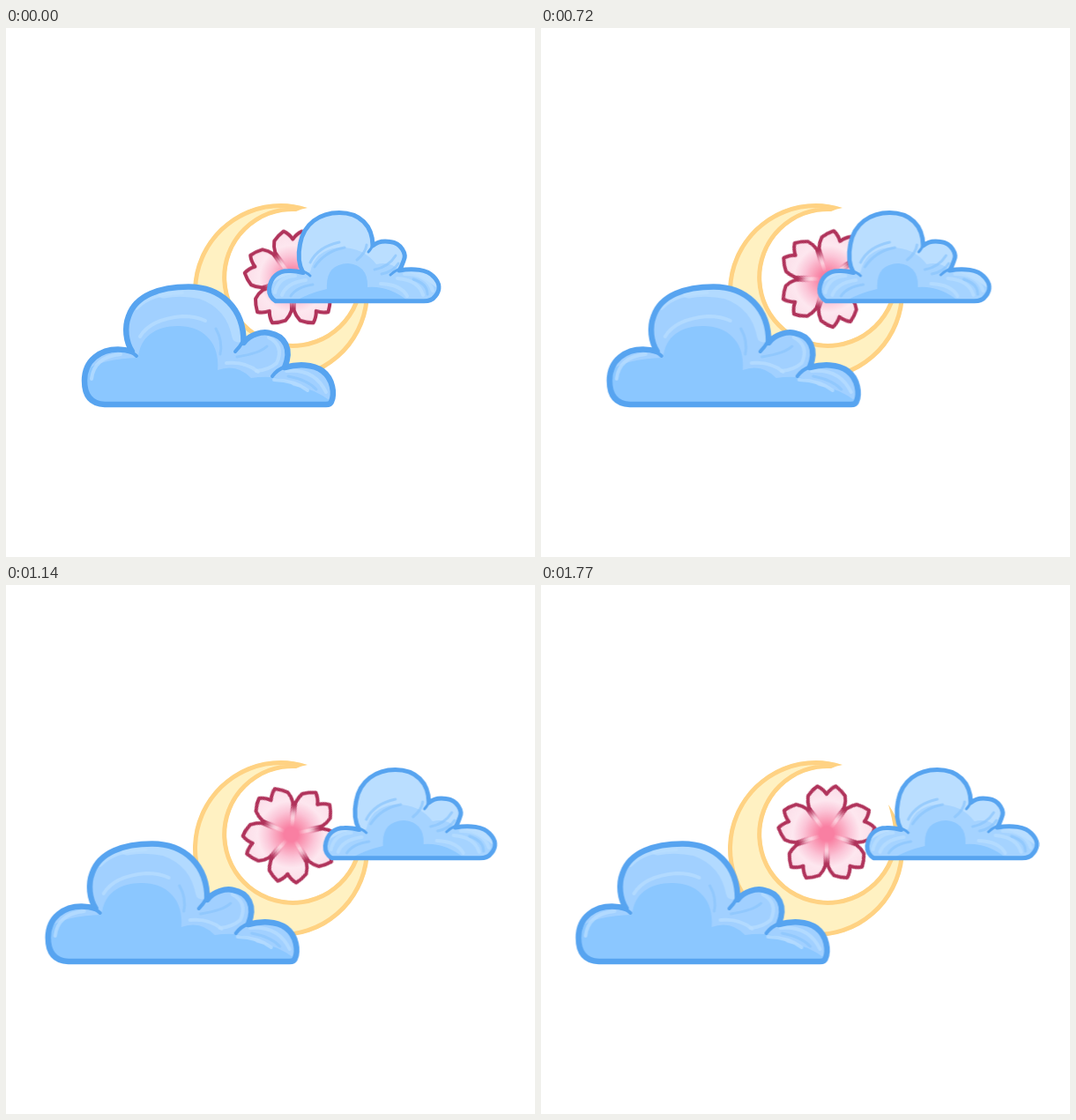
These frames come from a looping animation (600x600 px, 1.8 s). An HTML page:

```html
<!DOCTYPE html>
<html lang="en">
<head>
<meta charset="utf-8">
<title>Moon, blossom and clouds</title>
<style>
  html, body { margin: 0; width: 100%; height: 100%; overflow: hidden; background: #fff; }
  svg { display: block; width: 100%; height: 100%; }
  path { stroke-linecap: round; stroke-linejoin: round; }

  .moon { fill: #fff1c2; stroke: #ffd283; stroke-width: 10; }
  .petal { fill: url(#petalFill); stroke: url(#petalEdge); stroke-width: 4; }
  .edge { fill: none; stroke: #57a4f0; }
  .body { fill: #8bc7ff; }
  .soft { fill: none; stroke: #b9deff; stroke-width: 4; opacity: .75; }
  .rim { stroke-width: 13; }
  .shade { fill: none; stroke: #8bc5fc; stroke-width: 3; opacity: .7; }

  /* Each cloud drifts out, rests, then snaps back when the loop restarts. */
  .spin { animation: spin 1800ms cubic-bezier(.88, 0, .28, 1) infinite; }
  .drift { animation: drift 1800ms infinite; }
  .left { --dx: -46.5px; }
  .right { --dx: 71.5px; }
  @keyframes spin { to { transform: rotate(144deg); } }
  @keyframes drift {
    0% { transform: none; animation-timing-function: cubic-bezier(.8, 0, .6, 1); }
    77.8%, 100% { transform: translateX(var(--dx)); }
  }
</style>
</head>
<body>
<svg viewBox="0 0 600 600">
  <defs>
    <radialGradient id="petalFill" gradientUnits="userSpaceOnUse" cx="0" cy="0" r="56">
      <stop offset=".2" stop-color="#f98dab"/>
      <stop offset=".46" stop-color="#fbc3d6"/>
      <stop offset=".68" stop-color="#fde7ef"/>
      <stop offset="1" stop-color="#fbdde8"/>
    </radialGradient>
    <radialGradient id="petalEdge" gradientUnits="userSpaceOnUse" cx="0" cy="0" r="56">
      <stop offset=".32" stop-color="#e0698f" stop-opacity="0"/>
      <stop offset=".6" stop-color="#b0335b"/>
    </radialGradient>
    <radialGradient id="heart" gradientUnits="userSpaceOnUse" cx="0" cy="0" r="28">
      <stop offset=".3" stop-color="#f97fa2"/>
      <stop offset=".6" stop-color="#f9a0ba" stop-opacity=".6"/>
      <stop offset="1" stop-color="#fbc6d8" stop-opacity="0"/>
    </radialGradient>
    <path id="petal" class="petal" d="M0 0C-5 -14 -16 -23 -20 -30Q-22 -36 -21 -43Q-17 -49 -10.5 -54Q-4 -51 0 -45Q4 -51 10.5 -54Q17 -49 21 -43Q22 -36 20 -30C16 -23 5 -14 0 0Z"/>
    <path id="moonShape" d="M342 204Q326 199 312 199A100 100 0 1 0 411.6 308Q412 275 394 249Q396 256 398 265A75 75 0 1 1 329 208Q335 205 342 204Z"/>
    <path id="bigShape" d="M112 427Q89 426 89 400C89 376 108 364.5 127 364.5Q135 364.5 143 367C136 356 134 340 139 327C147 303 175 293.5 207 293.5C244 293.5 270 318 269.5 357C277 347 291 344 299 346C316 349 325 364 316 385C331 381 348 381 359 389C371 398 373 415 369 424Q368 427 363 427Z"/>
    <path id="smallShape" d="M306 309.8Q298 305 298.5 296C300 282 309 275.5 320 275.5Q328 275 337 277.5C331.5 268 331.5 255 333.5 245C337.5 222 356 209.5 378 209.5C401 209.5 416 224 416 247C422 241.5 430 241.5 436 242.5C448 244 455 256 451 264Q449 270 446 275C462 272 478 274 485 282C492 289 493 297 487 304Q483 309.8 474 309.8Z"/>
    <clipPath id="moonClip"><use href="#moonShape"/></clipPath>
    <clipPath id="bigClip"><use href="#bigShape"/></clipPath>
    <clipPath id="smallClip"><use href="#smallShape"/></clipPath>
  </defs>

  <use href="#moonShape" class="moon" clip-path="url(#moonClip)"/>

  <g transform="translate(325 283.2)">
    <g class="spin">
      <!-- The blossom sits slightly off its pivot. -->
      <g transform="translate(.3 1.4)">
        <use href="#petal"/>
        <use href="#petal" transform="rotate(72)"/>
        <use href="#petal" transform="rotate(144)"/>
        <use href="#petal" transform="rotate(216)"/>
        <use href="#petal" transform="rotate(288)"/>
        <circle r="28" fill="url(#heart)"/>
      </g>
    </g>
  </g>

  <g class="drift left">
    <g clip-path="url(#bigClip)">
      <use href="#bigShape" fill="#a1d0ff"/>
      <path class="soft rim" d="M178 300Q200 296 222 301Q256 313 263 350"/>
      <path class="body" d="M80 440V400Q92 376 150 374C152 350 170 338 195 338C225 338 243 358 240 388Q262 380 278 397Q312 392 326 406Q350 408 375 428V440Z"/>
      <path class="soft" d="M97 398Q100 373 130 370"/>
      <path class="soft" d="M152 350Q164 330 200 327Q216 327 226 332"/>
      <path class="soft" d="M148 318Q163 301 200 300"/>
      <path class="soft" d="M298 351Q316 360 307 380Q298 388 284 389"/>
      <path class="soft" d="M318 389Q350 386 363 413"/>
      <path class="shade" d="M238 341Q246 355 243 370"/>
      <path class="soft" d="M250 380Q272 378 286 390M304 399Q328 400 342 411"/>
      <path class="shade" d="M262 373Q288 369 296 361M320 395Q342 399 352 410"/>
    </g>
    <use href="#bigShape" class="edge" stroke-width="6.5"/>
    <path class="edge" stroke-width="4" d="M140 367Q145 369 148 372M269 355Q265 362 260 367M317 384Q308 387 302 395"/>
  </g>

  <g class="drift right">
    <g clip-path="url(#smallClip)">
      <use href="#smallShape" fill="#badeff"/>
      <path fill="#a5d3ff" d="M290 315V300Q312 276 345 277Q350 252 377 249Q405 248 420 268Q437 264 447 276Q474 280 495 300V315Z"/>
      <path class="body" d="M320 315Q338 302 364 296Q362 268 388 267Q411 269 410 294Q438 292 462 315Z"/>
      <path class="shade" d="M345 266Q354 248 378 243M350 271Q362 253 384 249M409 246Q408 255 398 263"/>
      <path class="soft" d="M305 300Q309 282 328 281M313 303Q318 289 340 286"/>
      <path class="shade" d="M418 274Q434 271 442 258M426 279Q440 276 445 267"/>
      <path class="soft" d="M452 279Q478 279 484 298M444 284Q468 286 473 303M425 290Q448 291 455 304"/>
      <path class="shade" d="M462 285Q478 290 478 302M323 304Q329 294 348 291"/>
    </g>
    <use href="#smallShape" class="edge" stroke-width="5"/>
    <path class="edge" stroke-width="3" d="M334 275Q341 277 345 281M416 245Q415 250 411 254M448 273Q441 275 436 280"/>
  </g>
</svg>
</body>
</html>
```
